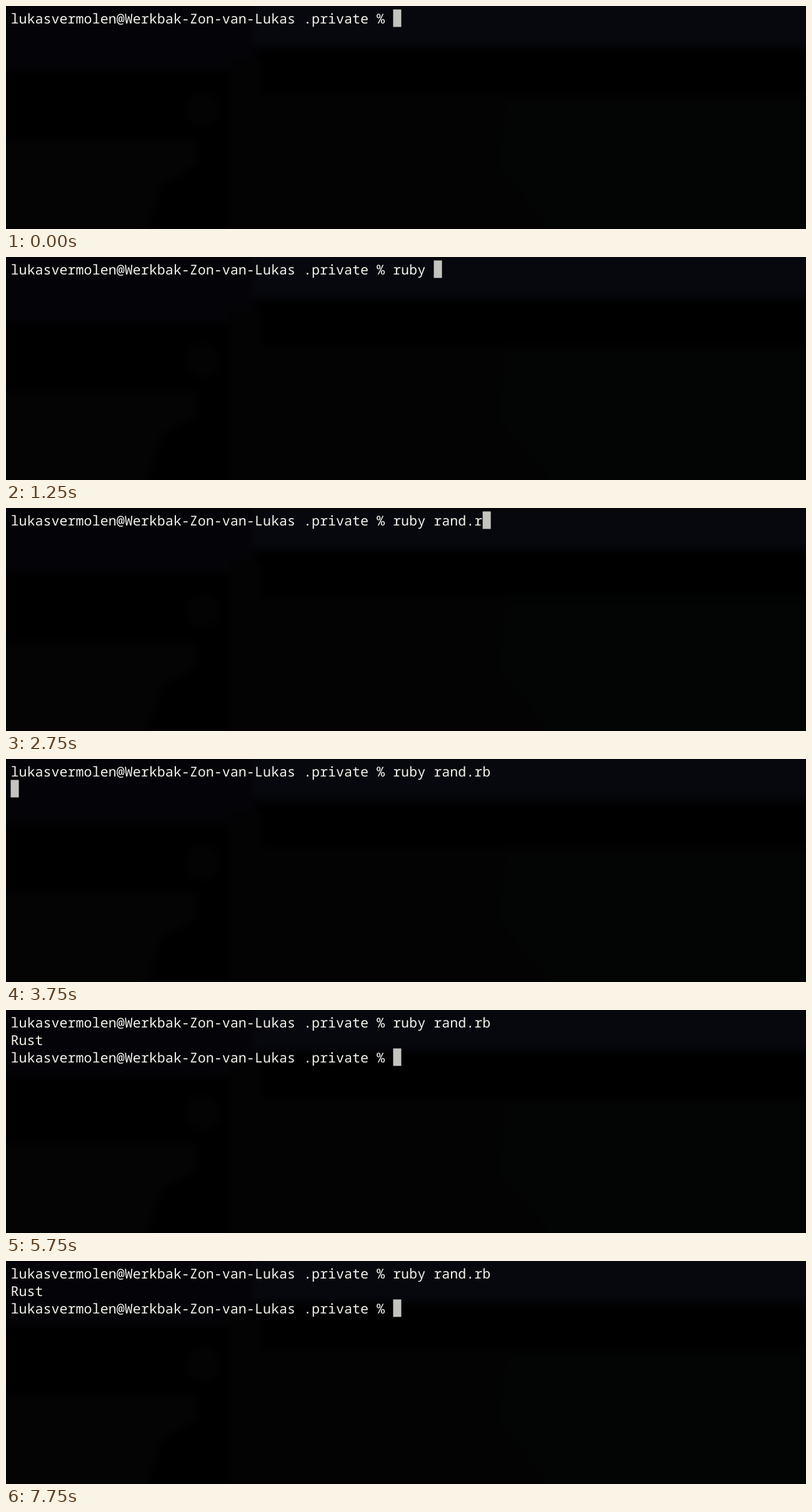
Recreate the animation shown at these times as an HTML page. Size 1280 by 357 pixels, loop 8000 ms.

```html
<!DOCTYPE html>
<html lang="en">
<head>
<meta charset="utf-8">
<title>Terminal</title>
<style>
  html, body { margin: 0; width: 100%; height: 100%; overflow: hidden; background: #000; }
  svg { display: block; width: 100%; height: 100%; }
  text {
    font: 21.7px "Noto Sans Mono", "DejaVu Sans Mono", monospace;
    fill: #f3f3ec;
    white-space: pre;
    text-rendering: geometricPrecision;
  }
</style>
</head>
<body>
<svg viewBox="0 0 1280 357">
  <defs>
    <filter id="soft" x="-20%" y="-40%" width="140%" height="180%" color-interpolation-filters="sRGB">
      <feGaussianBlur stdDeviation="7"/>
    </filter>
  </defs>
  <rect width="1280" height="357" fill="#000"/>
  <g filter="url(#soft)">
    <path d="M-30-30H400V80L350 105H-30Z" fill="#040307"/>
    <path d="M395-30H1310V66H395Z" fill="#07080d"/>
    <path d="M357 85H408V142H1310V390H357Z" fill="#030304"/>
    <path d="M800 150H1310V390H900L790 260Z" fill="#030404"/>
    <path d="M-30 215H305V255L250 285L215 390H-30Z" fill="#040404"/>
    <circle cx="315" cy="165" r="28" fill="#030303"/>
  </g>
  <rect id="cursor" width="13" height="28" fill="#c4c4bf"/>
  <text x="7.5" y="28"></text>
  <text x="7.5" y="56"></text>
  <text x="7.5" y="84"></text>
</svg>
<script>
const LOOP = 8000, STEP = 250, ENTER = 3500, OUTPUT = 4000;
const CELL = 13.02, LINE = 28;
const PROMPT = "lukasvermolen@Werkbak-Zon-van-Lukas .private % ";
const COMMAND = "ruby rand.rb";

const rows = document.querySelectorAll("text");
const cursor = document.getElementById("cursor");

function screenAt(t) {
  const lines = [PROMPT + COMMAND.slice(0, Math.floor(t / STEP))];
  if (t >= OUTPUT) lines.push("Rust", PROMPT);
  else if (t >= ENTER) lines.push("");
  return lines;
}

function draw(t) {
  const lines = screenAt(t);
  const last = lines.length - 1;
  rows.forEach((row, i) => {
    const content = lines[i] || "";
    if (row.textContent !== content) row.textContent = content;
  });
  cursor.setAttribute("x", 7.5 + lines[last].length * CELL);
  cursor.setAttribute("y", 5.5 + last * LINE);
}

const start = performance.now();
function tick() {
  draw((performance.now() - start) % LOOP);
  requestAnimationFrame(tick);
}
draw(0);
requestAnimationFrame(tick);
</script>
</body>
</html>
```
